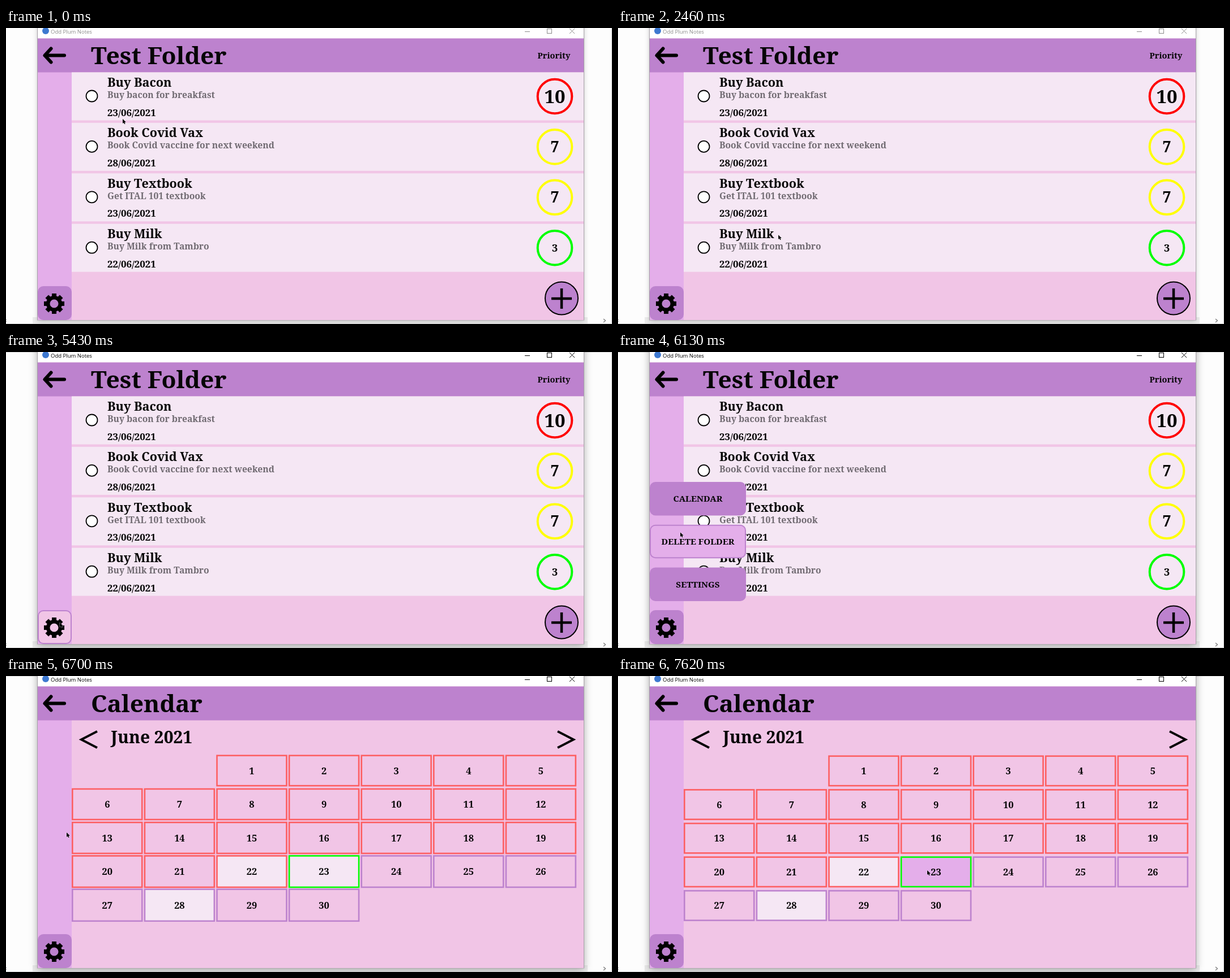
Recreate the animation shown at these times as an HTML page with a canvas. Size 1070 by 524 pixels, loop 8 s.

```html
<!DOCTYPE html>
<html lang="en">
<head>
<meta charset="utf-8">
<title>Task list</title>
<style>
  html, body { margin: 0; width: 100%; height: 100%; overflow: hidden; background: #fdfdfd; }
  canvas { display: block; }
</style>
</head>
<body>
<canvas id="stage" width="1070" height="524"></canvas>
<script>
const ctx = document.getElementById('stage').getContext('2d');
const LOOP = 8000, FOCUS = 5430, MENU_OPEN = 5600, PRESS = 6550, CALENDAR = 6700, SETTLED = 6730;
const PURPLE = '#bd82ce', LILAC = '#e4aeea', PINK = '#f1c5e6', PALE = '#f5e7f4', RED = '#fd5f62';
const SERIF = '"Noto Serif", serif';
const ARROW = new Path2D('M0 0V8L1.8 6.4 3.2 9.2 4.6 8.6 3.4 5.9 5.8 5.8Z');

const tasks = [
  { name: 'Buy Bacon', note: 'Buy bacon for breakfast', date: '23/06/2021', priority: 10 },
  { name: 'Book Covid Vax', note: 'Book Covid vaccine for next weekend', date: '28/06/2021', priority: 7 },
  { name: 'Buy Textbook', note: 'Get ITAL 101 textbook', date: '23/06/2021', priority: 7 },
  { name: 'Buy Milk', note: 'Buy Milk from Tambro', date: '22/06/2021', priority: 3 }
];
const priorityColor = p => p > 7 ? '#f00' : p > 4 ? '#ff0' : '#0f0';

// The pointer rests between moves; bow bends a move sideways.
const pointerStart = { x: 206, y: 161 };
const pointerMoves = [
  { start: 30, end: 850, x: 216, y: 249, bow: 66 },
  { start: 880, end: 1690, x: 172, y: 333, bow: 45 },
  { start: 1720, end: 2280, x: 279, y: 345, bow: 0 },
  { start: 2440, end: 2460, x: 283, y: 366, bow: 0 },
  { start: 2460, end: 3230, x: 188, y: 430, bow: 45 },
  { start: 4480, end: 5000, x: 95, y: 479, bow: 0 },
  { start: 5800, end: 6330, x: 107, y: 277, bow: 9 },
  { start: 6910, end: 7620, x: 546, y: 344, bow: 0 }
];

function pointerAt(t) {
  let { x, y } = pointerStart;
  for (const move of pointerMoves) {
    if (t < move.start) break;
    const k = 1 - (1 - Math.min(1, (t - move.start) / (move.end - move.start))) ** 1.6;
    x += (move.x - x) * k + move.bow * Math.sin(Math.PI * k);
    y += (move.y - y) * k;
  }
  return { x, y };
}

const inside = (p, x, y, w, h) => p.x >= x && p.x <= x + w && p.y >= y && p.y <= y + h;

function fillRect(x, y, w, h, color) {
  ctx.fillStyle = color;
  ctx.fillRect(x, y, w, h);
}

function strokeRect(x, y, w, h, width, color) {
  ctx.strokeStyle = color;
  ctx.lineWidth = width;
  ctx.strokeRect(x, y, w, h);
}

function text(str, x, y, size, { color = '#050505', align = 'left', font = SERIF, weight = 'bold' } = {}) {
  ctx.font = `${weight} ${size}px ${font}`;
  ctx.textAlign = align;
  ctx.fillStyle = color;
  ctx.fillText(str, x, y);
}

function line(x1, y1, x2, y2, width = 1, color = '#000') {
  ctx.beginPath();
  ctx.moveTo(x1, y1);
  ctx.lineTo(x2, y2);
  ctx.lineWidth = width;
  ctx.strokeStyle = color;
  ctx.stroke();
}

// An angle bracket with its tip at x, y; a negative reach points right.
function chevron(x, y, reach, half, width, color = '#000') {
  ctx.beginPath();
  ctx.moveTo(x + reach, y - half);
  ctx.lineTo(x, y);
  ctx.lineTo(x + reach, y + half);
  ctx.lineWidth = width;
  ctx.strokeStyle = color;
  ctx.stroke();
}

function circle(x, y, r, fill, stroke, width) {
  ctx.beginPath();
  ctx.arc(x, y, r, 0, Math.PI * 2);
  if (fill) { ctx.fillStyle = fill; ctx.fill(); }
  if (stroke) { ctx.strokeStyle = stroke; ctx.lineWidth = width; ctx.stroke(); }
}

function button(x, y, w, h, color) {
  ctx.beginPath();
  ctx.roundRect(x + 1, y + 1, w - 2, h - 2, 9);
  ctx.fillStyle = color;
  ctx.fill();
  ctx.strokeStyle = PURPLE;
  ctx.lineWidth = 2;
  ctx.stroke();
}

function drawDesktop(active) {
  fillRect(0, 0, 1070, 524, '#fdfdfd');
  fillRect(47, 512, 980, 12, '#ececec');
  line(1069.5, 0, 1069.5, 524, 1, '#c8c8c8');
  line(0, 523.5, 1070, 523.5, 1, '#d2d2d2');
  if (active) line(0, .5, 1070, .5, 1, '#d8d8d8');
  chevron(1058.5, 518, -3.5, 3, 1.2, '#777');
  chevron(-1, 518, 2, 2, 1, '#777');

  ctx.save();
  ctx.shadowColor = `rgba(0,0,0,${active ? .36 : .22})`;
  ctx.shadowBlur = active ? 14 : 9;
  ctx.shadowOffsetY = 2;
  fillRect(56, -20, 964, 537, '#fff');
  ctx.restore();
  strokeRect(55.5, -20, 965, 537, 1, '#a4a0a6');

  const ink = active ? '#000' : '#8b8b8b';
  circle(70, 5, 6, '#3d78d0');
  text('Odd Plum Notes', 79, 9.5, 9.5, { color: ink, font: '"Open Sans", sans-serif', weight: 'normal' });
  line(916, 6.5, 925, 6.5, 1, ink);
  strokeRect(955.5, 1.5, 8, 8, 1, ink);
  line(995, 1, 1004, 10, 1, ink);
  line(1004, 1, 995, 10, 1, ink);
}

function drawShell(title) {
  fillRect(56, 18.5, 964, 498.5, PINK);
  fillRect(56, 78, 60, 439, LILAC);
  fillRect(56, 18.5, 964, 60, PURPLE);
  ctx.save();
  ctx.lineCap = ctx.lineJoin = 'round';
  line(69, 48.5, 103, 48.5, 6);
  chevron(68.5, 48.5, 11, 12, 6);
  ctx.restore();
  text(title, 150, 64, 42.5);
}

function drawGearButton(color) {
  button(56, 457, 60, 60, color);
  ctx.save();
  ctx.translate(85, 488);
  for (let i = 0; i < 8; i++) {
    line(0, -11, 0, -18, 8);
    ctx.rotate(Math.PI / 4);
  }
  circle(0, 0, 10.8, null, '#000', 6.5);
  ctx.restore();
}

function drawTasks() {
  text('Priority', 967.5, 54, 14.5, { align: 'center' });
  tasks.forEach(({ name, note, date, priority }, i) => {
    const y = 78.5 + 89.4 * i, size = 12 + 2.1 * priority;
    fillRect(116, y, 904, 85, PALE);
    circle(151.5, y + 42, 10, '#fff', '#000', 1.8);
    text(name, 179, y + 25.5, 21.6);
    text(note, 179, y + 45.5, 15.6, { color: '#716b72' });
    text(date, 179, y + 77, 17);
    circle(969, y + 42.5, 30.3, null, priorityColor(priority), 4);
    text(priority, 969, y + 42.5 + size * .357, size, { align: 'center' });
  });
  circle(981, 478.5, 29, PURPLE, '#000', 2);
  line(963, 479, 999, 479, 4.5);
  line(981, 461, 981, 497, 4.5);
}

function drawMenu(t, pointer) {
  ['CALENDAR', 'DELETE FOLDER', 'SETTINGS'].forEach((label, i) => {
    const y = 230 + 75.7 * i;
    const hovered = inside(pointer, 56, y, 170, 59.5);
    button(56, y, 170, 59.5, !hovered ? PURPLE : t >= PRESS ? PINK : LILAC);
    text(label, 141, y + 35.3, 15.2, { align: 'center' });
  });
}

function drawCalendar(t, pointer) {
  text('June 2021', 185, 118.5, 30);
  chevron(133, 112.5, 28, 14.5, 4);
  chevron(1002, 112.5, -28, 14.5, 4);
  const settled = t >= SETTLED;
  for (let day = 1; day <= 30; day++) {
    const row = Math.floor((day + 1) / 7), x = 116 + 127.6 * ((day + 1) % 7);
    const y = settled ? 140.5 + 59.6 * row : 139.5 + 59.2 * row;
    const w = 125.5, h = settled ? 55 : 56 + .7 * row;
    const hasTask = [22, 23, 28].includes(day);
    fillRect(x, y, w, h, inside(pointer, x, y, w, h) ? LILAC : hasTask ? PALE : PINK);
    strokeRect(x + 1.3, y + 1.3, w - 2.6, h - 2.6, 2.6, day < 23 ? RED : day === 23 ? '#0f0' : PURPLE);
    text(day, x + w / 2, y + h / 2 + 6, 16.5, { align: 'center' });
  }
}

function drawPointer({ x, y }) {
  ctx.save();
  ctx.translate(x, y);
  ctx.strokeStyle = 'rgba(255,255,255,.6)';
  ctx.lineWidth = 1;
  ctx.stroke(ARROW);
  ctx.fillStyle = '#000';
  ctx.fill(ARROW);
  ctx.restore();
}

function draw(t) {
  const pointer = pointerAt(t);
  const gearHovered = inside(pointer, 56, 457, 60, 60);
  const gearPressed = t >= FOCUS && t < MENU_OPEN;
  drawDesktop(t >= FOCUS);
  if (t < CALENDAR) {
    drawShell('Test Folder');
    drawTasks();
    if (t >= MENU_OPEN) drawMenu(t, pointer);
  } else {
    drawShell('Calendar');
    drawCalendar(t, pointer);
  }
  drawGearButton(gearPressed ? PINK : gearHovered ? LILAC : PURPLE);
  drawPointer(pointer);
}

function frame() {
  draw(performance.now() % LOOP);
  requestAnimationFrame(frame);
}
frame();
</script>
</body>
</html>
```
